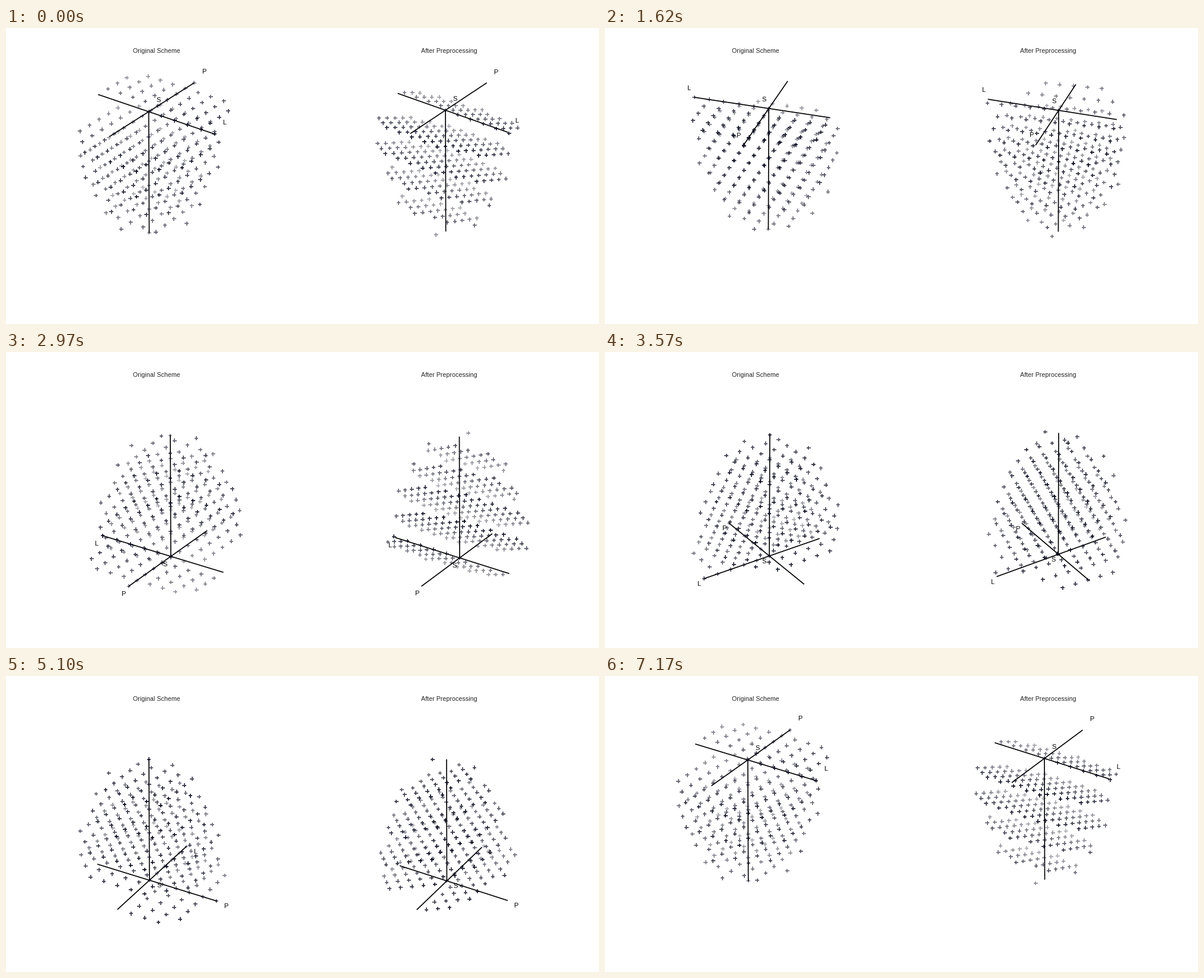
Write a matplotlib script that moves like this. It is 1000x500 px and loops after 7.2 s.

```python
import itertools
import math

import numpy as np
import matplotlib.pyplot as plt
from matplotlib.animation import FuncAnimation

DPI = 100
WIDTH, HEIGHT = 1000, 500
PANEL_H = 479.5       # panel height, px
MARGIN = 0.05
Z_SHIFT = 0.02
INK = "#03051a"
UNIT_CUBE_ZOOM = math.sqrt(3) / (1.8294640721620434 * 25 / 24)
LABEL_GAP = 5 / math.sqrt(5000 / 25)
STEP = 3              # degrees per frame
SWING = 60            # frames per leg of the camera path

plt.rcParams["font.family"] = "Liberation Sans"


def half_grid(radius=5):
    """Integer lattice points in one half of a ball."""
    span = range(-radius, radius + 1)
    keep = [(x, y, z) for x, y, z in itertools.product(span, repeat=3)
            if x * x + y * y + z * z <= radius * radius
            and (z, -y, -x) <= (0, 0, 0)]
    return np.array(keep, float)


def rotation(ax_deg, ay_deg, az_deg):
    def turn(deg, i, j):
        m = np.eye(3)
        c, s = math.cos(math.radians(deg)), math.sin(math.radians(deg))
        m[i, i] = m[j, j] = c
        m[j, i], m[i, j] = s, -s
        return m
    return turn(az_deg, 0, 1) @ turn(ay_deg, 2, 0) @ turn(ax_deg, 1, 2)


def padded_limits(points, lows, highs):
    lo = np.minimum(points.min(0), lows)
    hi = np.maximum(points.max(0), highs)
    pad = MARGIN * (hi - lo)
    shift = np.array([0, 0, Z_SHIFT])
    return np.column_stack([lo - pad + shift, hi + pad + shift])


def add_panel(fig, center, width, title, title_x, points, lows, highs):
    rect = [(center - width / 2) / WIDTH, 0.5 - PANEL_H / 2 / HEIGHT,
            width / WIDTH, PANEL_H / HEIGHT]
    ax = fig.add_axes(rect, projection="3d")
    ax.apply_aspect = lambda position=None: None  # let the view fill the panel
    ax.set_axis_off()
    ax.patch.set_visible(False)
    ax.scatter(*points.T, color=INK, marker="+", s=4.8 ** 2, linewidths=1.2)
    for i, name in enumerate("LPS"):
        ends = np.zeros((2, 3))
        ends[:, i] = lows[i], highs[i]
        ax.plot(*ends.T, color="k", lw=1.2)
        ax.text(*(ends[1] + LABEL_GAP), name, size=8, color="k", zorder=1)
    xlim, ylim, zlim = padded_limits(points, lows, highs)
    ax.set(xlim=xlim, ylim=ylim, zlim=zlim)
    ax.set_box_aspect((1, 1, 1), zoom=UNIT_CUBE_ZOOM)
    fig.text(title_x / WIDTH, 1 - 41.5 / HEIGHT, title, size=7.68,
             color="0.15", ha="center", va="baseline")
    return ax


grid = half_grid()
lows, highs = grid.min(0), grid.max(0)
turned = grid @ rotation(-12.8, 1.1, 2.5).T

fig = plt.figure(figsize=(WIDTH / DPI, HEIGHT / DPI), dpi=DPI, facecolor="w")
panels = [
    add_panel(fig, 252.9, 479.5, "Original Scheme", 253.4, grid, lows, highs),
    add_panel(fig, 746.8, 459, "After Preprocessing", 747, turned, lows, highs),
]


def camera(frame):
    """Azimuth swings out, then elevation, then both swing back."""
    leg, k = divmod(frame, SWING)
    k = (k + 1) * STEP
    full = SWING * STEP
    azim = (k, full, full - k, 0)[leg] - 57
    elev = (0, k, full, full - k)[leg] + 30
    return elev, azim


def update(frame):
    elev, azim = camera(frame)
    for ax in panels:
        ax.view_init(elev=elev, azim=azim)
    return panels


anim = FuncAnimation(fig, update, frames=4 * SWING, interval=30,
                     repeat=True, repeat_delay=0, blit=False)
plt.show()
```
